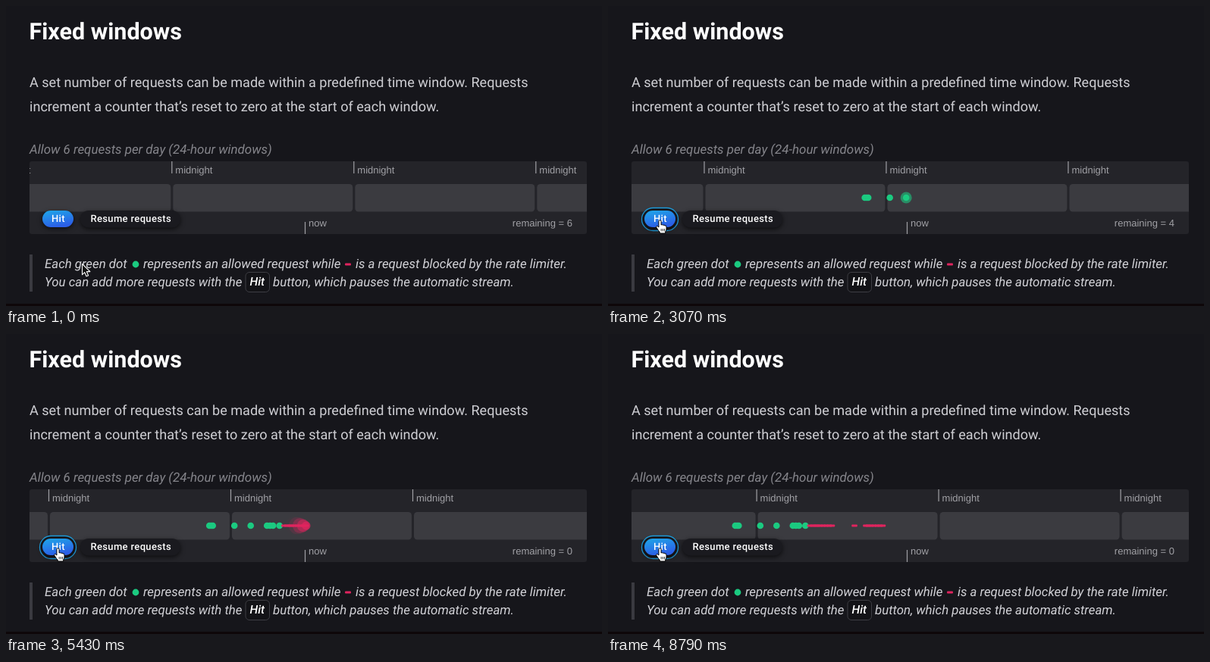
These frames come from a looping animation (786x396 px, 8.87 s). An HTML page:

```html
<!DOCTYPE html>
<html lang="en">
<head>
<meta charset="utf-8">
<title>Fixed windows</title>
<style>
  html, body { margin: 0; width: 100%; height: 100%; overflow: hidden; background: #16161b; }
  svg { display: block; width: 786px; height: 396px; font-family: Roboto, Inter, sans-serif; text-rendering: geometricPrecision; }
  .title { font-size: 30.5px; font-weight: 700; fill: #fff; }
  .body { font-size: 18.08px; fill: #cfcfd4; }
  .caption { font-size: 16.95px; font-style: italic; fill: #85858b; }
  .quote { font-size: 16.84px; font-style: italic; fill: #d2d2d7; }
  .kbd { font-size: 15.5px; font-style: italic; font-weight: 500; fill: #fff; }
  .label { font: 13px "Liberation Sans", Arial, sans-serif; fill: #a0a0a5; }
  .button { font-size: 13px; font-weight: 500; letter-spacing: .35px; fill: #fff; }
  .shadow { filter: drop-shadow(0 2px 3px rgba(0, 0, 0, .65)); }
  .tick { stroke: #a0a0a5; stroke-width: 1.2; }
  .allowed { fill: #1bca80; }
  .blocked { fill: #e0245e; }
</style>
</head>
<body>
<svg viewBox="0 0 786 396">
  <defs>
    <clipPath id="panel"><rect x="31" y="205" width="735" height="96" rx="3"/></clipPath>
    <linearGradient id="blue" x1="0" y1="0" x2=".35" y2="1">
      <stop offset="0" stop-color="#1fa8e8"/><stop offset="1" stop-color="#2b5fe6"/>
    </linearGradient>
  </defs>
  <rect width="786" height="396" fill="#16161b"/>
  <rect y="393" width="786" height="3" fill="#0e0709"/>

  <text class="title" x="30.5" y="44">Fixed windows</text>
  <text class="body" x="31" y="107">A set number of requests can be made within a predefined time window. Requests</text>
  <text class="body" x="31" y="139">increment a counter that’s reset to zero at the start of each window.</text>
  <text class="caption" x="31" y="195">Allow 6 requests per day (24-hour windows)</text>

  <g clip-path="url(#panel)">
    <rect x="31" y="205" width="735" height="96" fill="#242429"/>
    <g id="windows"></g>
    <g id="ripples"></g>
    <g id="marks"></g>
    <path class="tick" d="M394.5 285v16"/>
    <text class="label" x="399" y="291">now</text>
    <text class="label" id="remaining" x="747" y="291" text-anchor="end">remaining = 6</text>
  </g>

  <g class="shadow">
    <rect x="98" y="270" width="132" height="22.5" rx="11.25" fill="#1a1a1f"/>
  </g>
  <text class="button" x="111.5" y="285">Resume requests</text>
  <g id="focus">
    <rect x="44.5" y="266.5" width="48" height="30" rx="15" fill="#1a1a1f" stroke="#1f9ddb" stroke-width="1.3"/>
  </g>
  <g class="shadow">
    <rect id="hit" x="48" y="270" width="41" height="22" rx="11" fill="url(#blue)"/>
  </g>
  <text class="button" id="hitText" x="60" y="285">Hit</text>

  <rect x="31" y="328" width="4" height="49" fill="#3a3a40"/>
  <text class="quote" x="51" y="346">Each green dot</text>
  <circle class="allowed" cx="171" cy="341" r="4.4"/>
  <text class="quote" x="181" y="346">represents an allowed request while</text>
  <rect class="blocked" x="447" y="339.5" width="8" height="3" rx="1"/>
  <text class="quote" x="461" y="346">is a request blocked by the rate limiter.</text>
  <text class="quote" x="51" y="370">You can add more requests with the</text>
  <rect x="316" y="351.5" width="31.5" height="26" rx="5" fill="#131317" stroke="#3e3e44"/>
  <text class="kbd" x="321.5" y="369">Hit</text>
  <text class="quote" x="352" y="370">button, which pauses the automatic stream.</text>

  <g id="cursor">
    <path id="arrow" d="M0 0v14.2l3.3-3.1 2.2 5.2 2.6-1.1-2.2-5.1h4.5z" fill="#111" stroke="#fff" stroke-width="1.1" stroke-linejoin="round"/>
    <g id="hand" fill="#fff" stroke="#000" stroke-width="1" stroke-linejoin="round">
      <path d="M-1.6 9V1.3a1.6 1.6 0 0 1 3.2 0V6q1.2-1 2.5.3 1.4-.7 2.4.5 2-.3 2 1.6v3.2q0 1.6-1.3 3.2V17H-.3v-1.8Q-2 13.6-3.4 11.2q-1.5-2.1-1.5-3 .5-1.3 2-.3z"/>
      <path d="M1.7 11v3.3M3.9 11v3.3M6 11v3.3" fill="none" stroke-width=".8"/>
    </g>
  </g>
</svg>
<script>
const LOOP = 8870, FPS = 14, SPEED = 0.0299;
const FIRST_TICK = 218.8, WINDOW = 240, NOW = 394.5, SPAWN = 396.7;
const LIMIT = 6, RIPPLE = 600, PRESS = 80, ROW = 253;
const RESET = (FIRST_TICK + WINDOW - NOW) / SPEED;
const HITS = [
  1131, 1210, 1282, 2235, 2954, 3673, 3807, 3940, 4225,
  4430, 4550, 4670, 4760, 4880, 5010, 5140, 5270, 5400,
  6390, 6890, 7000, 7120, 7250, 7390, 7510, 7640
];

const $ = id => document.getElementById(id);
const show = (el, on) => el.setAttribute('display', on ? 'inline' : 'none');
function add(parent, name, attrs, text = '') {
  const el = document.createElementNS('http://www.w3.org/2000/svg', name);
  for (const key in attrs) el.setAttribute(key, attrs[key]);
  el.textContent = text;
  return parent.appendChild(el);
}

for (let i = -1; i < 4; i++) {
  const x = FIRST_TICK + i * WINDOW;
  add($('windows'), 'rect', { x: x + 1.5, y: 235, width: WINDOW - 3, height: 36.5, rx: 4.5, fill: '#3b3b40' });
  add($('windows'), 'path', { class: 'tick', d: `M${x} 205v16` });
  add($('windows'), 'text', { class: 'label', x: x + 4.5, y: 221 }, 'midnight');
}

const usedBy = t => HITS.filter(h => h <= t && (t < RESET || h >= RESET)).length;
const requests = HITS.map(time => {
  const allowed = usedBy(time) <= LIMIT;
  const kind = { class: allowed ? 'allowed' : 'blocked' };
  return {
    time,
    ripple: add($('ripples'), 'circle', { ...kind, cy: ROW }),
    mark: allowed
      ? add($('marks'), 'circle', { ...kind, cy: ROW, r: 4.3 })
      : add($('marks'), 'rect', { ...kind, x: -3.8, y: ROW - 1.5, width: 7.6, height: 3, rx: 1 })
  };
});

function drawRequest({ time, ripple, mark }, t) {
  const age = t - time, p = age / RIPPLE;
  const x = SPAWN - age * SPEED;
  show(mark, age >= 0);
  show(ripple, age >= 0 && p < 1);
  mark.setAttribute('transform', `translate(${x} 0)`);
  if (p < 0 || p > 1) return;
  ripple.setAttribute('cx', x);
  ripple.setAttribute('r', 5 + 7 * (1 - (1 - p) ** 2));
  ripple.setAttribute('opacity', 0.8 * (1 - p) ** 1.5);
}

function drawCursor(t) {
  const p = Math.min(1, Math.max(0, (t - 150) / 650));
  const ease = p * p * (3 - 2 * p);
  const x = 100.5 - 32 * ease, y = 340.5 - 57.5 * ease;
  $('cursor').setAttribute('transform', `translate(${x} ${y})`);
  show($('hand'), y < 292);
  show($('arrow'), y >= 292);
}

function draw(t) {
  $('windows').setAttribute('transform', `translate(${-t * SPEED} 0)`);
  requests.forEach(r => drawRequest(r, t));
  $('remaining').textContent = `remaining = ${Math.max(0, LIMIT - usedBy(t))}`;
  const pressed = HITS.some(h => t >= h - PRESS && t < h);
  $('hit').setAttribute('fill', pressed ? '#1a1a1f' : 'url(#blue)');
  $('hitText').setAttribute('y', pressed ? 286 : 285);
  show($('focus'), t >= HITS[0] - PRESS);
  drawCursor(t);
}

const start = performance.now();
function frame() {
  const elapsed = (performance.now() - start) % LOOP;
  draw(Math.floor((elapsed + 5) * FPS / 1000) * 1000 / FPS);
  requestAnimationFrame(frame);
}
frame();
</script>
</body>
</html>
```
